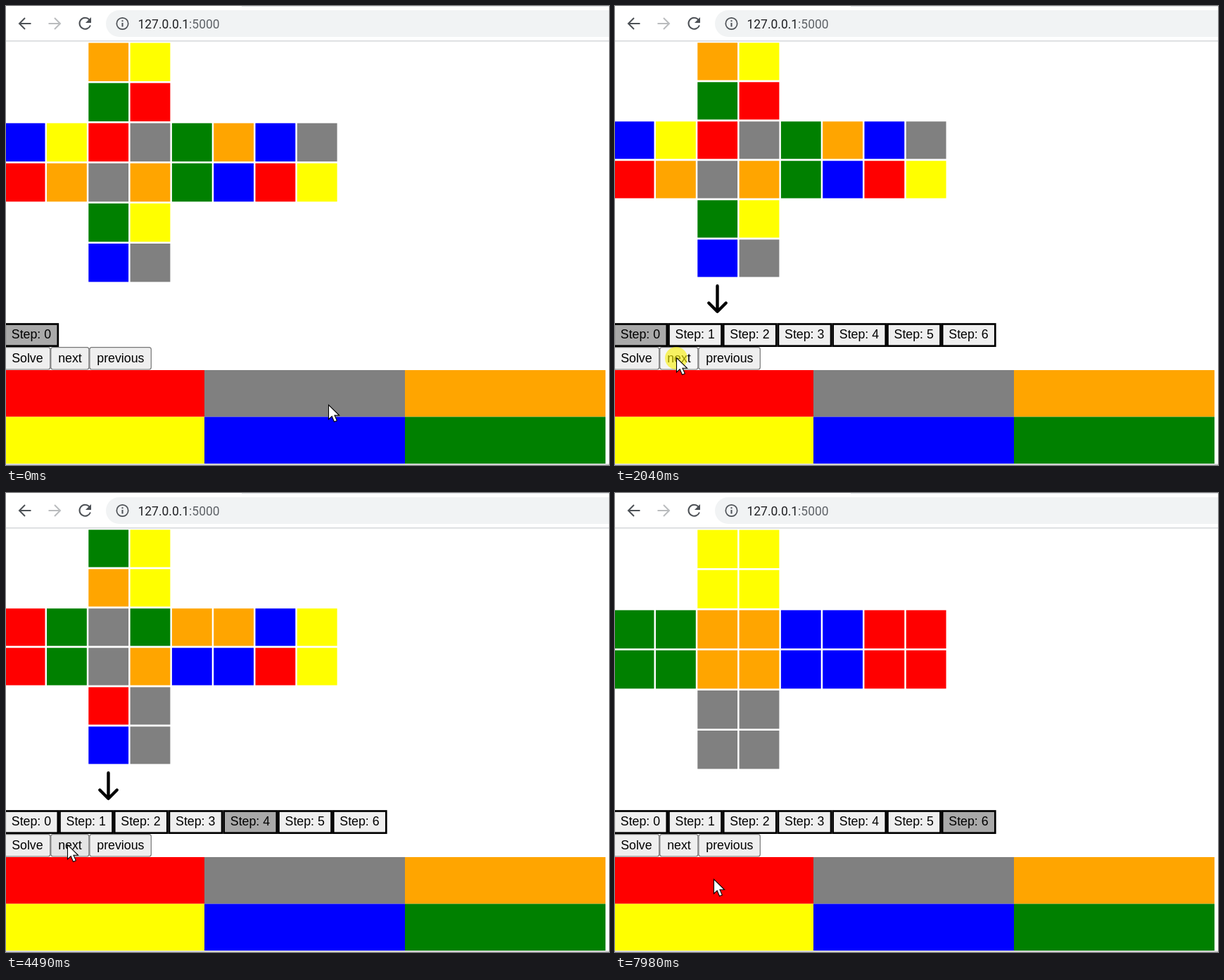
An HTML page for the animation above (8 s loop, 857 by 653 pixels).

```html
<!DOCTYPE html>
<html lang="en">
<head>
<meta charset="utf-8">
<title>Cube solver</title>
<style>
  html, body { margin: 0; width: 100%; height: 100%; overflow: hidden; background: #fff; }
  svg { display: block; width: 100%; height: 100%; }
  .label { font: 17.78px "Liberation Sans", Arial, sans-serif; }
  .url { font: 17.45px Roboto, "Open Sans", sans-serif; }
  .line { fill: none; stroke: #000; stroke-linecap: round; stroke-linejoin: round; }
  .nav { fill: none; stroke: #4d5156; stroke-width: 2; }
</style>
</head>
<body>
<svg id="stage" viewBox="0 0 857 653">
  <path d="M335 .5H857" stroke="#dee1e6"/>
  <path class="nav" d="M35.5 25H19.5M27 17L19 25L27 33"/>
  <path class="nav" d="M60.5 25H76.5M69 17L77 25L69 33" style="stroke:#babcbe"/>
  <path class="nav" d="M118.3 19.2A8 8 0 1 0 120 27.5"/>
  <path d="M121 16V24H113Z" fill="#4d5156"/>
  <rect x="142" y="6" width="760" height="38" rx="19" fill="#f1f3f4"/>
  <circle class="nav" cx="165.5" cy="25" r="8.2" style="stroke-width:1.7"/>
  <path class="nav" d="M165.5 24V29.5M165.5 20.3V22.3"/>
  <text class="url" x="187.5" y="31.6" fill="#202124">127.0.0.1<tspan fill="#5f6368">:5000</tspan></text>
  <path d="M0 49.8H857" stroke="#d5d7da" stroke-width="1.4"/>
  <g id="net"></g>
  <g id="icons">
    <g id="turn" transform="translate(264.5 304)">
      <rect x="-28.5" y="-28" width="57" height="57" fill="#fdfdfd"/>
      <path class="line" stroke-width="3" d="M-17.5-9.5A20 20 0 0 1 19.5 1M11-4L19.3 2L25.5-6M17.5 9.5A20 20 0 0 1-19.5-1M-11 4L-19.3-2L-25.5 6"/>
    </g>
    <g id="arrow">
      <path class="line" stroke-width="4.4" d="M0-18.3V18M-12.2 6L0 18.2L12.2 6"/>
    </g>
  </g>
  <g id="steps"></g>
  <g id="buttons"></g>
  <g id="palette"></g>
  <path d="M0 652.3H857" stroke="#c9c9c9" stroke-width="1.4"/>
  <circle id="glow" r="16" fill="#f8f000" opacity=".6"/>
  <path id="cursor" d="M0 0V20.5L4.7 16.2L8 24L11.8 22.4L8.5 14.8H15Z" fill="#fff" stroke="#000" stroke-width="1.1"/>
</svg>
<script>
const LOOP = 8000;
const COLOURS = { r: '#f00', a: '#808080', o: '#ffa500', y: '#ff0', b: '#00f', g: '#008000' };
const $ = id => document.getElementById(id);

function add(parent, tag, attrs, text = '') {
  const el = document.createElementNS('http://www.w3.org/2000/svg', tag);
  set(el, attrs);
  el.textContent = text;
  return parent.appendChild(el);
}
function set(el, attrs) {
  for (const k in attrs) el.setAttribute(k, attrs[k]);
}
const show = (el, on) => set(el, { visibility: on ? 'visible' : 'hidden' });

// Stickers are numbered face by face: up, left, front, right, back, down.
const CYCLES = {
  L: [[0, 8, 20, 19], [2, 10, 22, 17], [4, 5, 7, 6]],
  F: [[2, 12, 21, 7], [3, 14, 20, 5], [8, 9, 11, 10]],
  U: [[8, 4, 16, 12], [9, 5, 17, 13], [0, 1, 3, 2]]
};
function turn(state, move) {
  const next = [...state];
  for (const c of CYCLES[move[0]])
    c.forEach((from, i) => next[c[(i + (move[1] ? 3 : 1)) % 4]] = state[from]);
  return next;
}
const states = [[...'oygr' + 'byro' + 'raao' + 'gogb' + 'bary' + 'gyba']];
for (const m of ['L', 'F', "L'", 'F', 'L', 'U']) states.push(turn(states.at(-1), m));

// Icon announcing the move that follows each step.
const ICONS = ['down', 'turn', 'up', 'turn', 'down', 'left', ''];
const ARROWS = {
  down: 'translate(145.5 416.5)',
  up: 'translate(145.5 416.5) rotate(180)',
  left: 'translate(502.5 194.5) rotate(90)'
};
const TALL_ROW = { turn: 4, left: 2 };

const FACES = [[2, 0], [0, 2], [2, 2], [4, 2], [6, 2], [2, 4]];
const cells = states[0].map((_, i) => {
  const [col, row] = FACES[i >> 2];
  const x = 59.3 * (col + i % 2) - 1.3;
  return { row: row + (i % 4 >> 1), el: add($('net'), 'rect', { x, width: 56.8 }) };
});

function box(parent, label, x, width, y, attrs) {
  const el = add(parent, 'rect', { x, y, width, fill: '#efefef', ...attrs });
  add(parent, 'text', { class: 'label', x: x + 10.4 - (attrs.inset || 0), y: attrs.base }, label);
  return el;
}
const steps = states.map((_, i) => {
  const g = add($('steps'), 'g', {});
  const rect = box(g, 'Step: ' + i, -1.3 + 77.75 * i, 75.1, 452.5,
    { height: 31.2, stroke: '#000', 'stroke-width': 2.7, base: 473.2, inset: 1.3 });
  return { g, rect };
});
const [solveBtn, nextBtn] = [['Solve', -2.2, 65], ['next', 63.8, 54.1], ['previous', 118.9, 87.4]]
  .map(([label, x, w]) => box($('buttons'), label, x, w, 485.6,
    { height: 31.4, rx: 3, stroke: '#767676', 'stroke-width': 1.2, base: 507 }));

[...'raoybg'].forEach((c, i) => {
  const col = i % 3, x = [0, 282, 567][col];
  add($('palette'), 'rect', {
    x, y: i < 3 ? 518 : 584.5, width: [282, 285, 285][col], height: 66.5, fill: COLOURS[c]
  });
});

// start, number of ticks, tick length, from, to
const MOVES = [
  [70, 11, 68, [458, 567], [40, 501]],
  [1630, 5, 68, [40, 501], [87, 500]],
  [7560, 7, 70, [87, 500], [140, 549]]
];
const CLICKS = [[880, 1020], [2040, 2180], [2840, 2970], [3500, 3630], [4360, 4490], [6480, 6620], [6890, 6960]];
const STEP_TIMES = [2180, 2970, 3630, 4490, 6550, 6960];
const SOLVED = 1080, ICON_READY = 1220;

function pointer(t) {
  let pos = MOVES[0][3];
  for (const [start, count, tick, a, b] of MOVES) {
    if (t < start) break;
    const p = Math.min(1, (Math.floor((t - start) / tick) + 1) / count);
    const e = p * p * (3 - 2 * p);
    pos = a.map((v, i) => v + (b[i] - v) * e);
  }
  return pos;
}

function draw(t) {
  const step = STEP_TIMES.filter(s => t >= s).length;
  const icon = t >= ICON_READY ? ICONS[step] : '';
  const tall = TALL_ROW[icon] ?? 9;
  const [top, pitch, height] = icon ? [52.3, 56, 53.2] : [52.5, 57.1, 54.5];
  cells.forEach(({ row, el }, i) => set(el, {
    y: top + pitch * row + (row > tall ? 9 : 0),
    height: height + (row === tall ? 9 : 0),
    fill: COLOURS[states[step][i]]
  }));

  show($('turn'), icon === 'turn');
  show($('arrow'), icon in ARROWS);
  if (ARROWS[icon]) set($('arrow'), { transform: ARROWS[icon] });

  steps.forEach(({ g, rect }, i) => {
    show(g, i === 0 || t >= SOLVED);
    set(rect, { fill: i === step ? '#a9a9a9' : '#efefef' });
  });

  const [x, y] = pointer(t);
  const pressed = CLICKS.some(([on, off]) => t >= on && t < off);
  const face = over => !over ? '#efefef' : pressed ? '#f5f5f5' : '#e5e5e5';
  const inRow = y >= 485 && y < 517;
  set(solveBtn, { fill: face(inRow && x < 63) });
  set(nextBtn, { fill: face(inRow && x >= 63 && x < 118) });
  show($('glow'), pressed);
  set($('glow'), { cx: x, cy: y + 1 });
  set($('cursor'), { transform: `translate(${x + .5} ${y + .5})` });
}

function frame() {
  draw(performance.now() % LOOP);
  requestAnimationFrame(frame);
}
frame();
</script>
</body>
</html>
```
